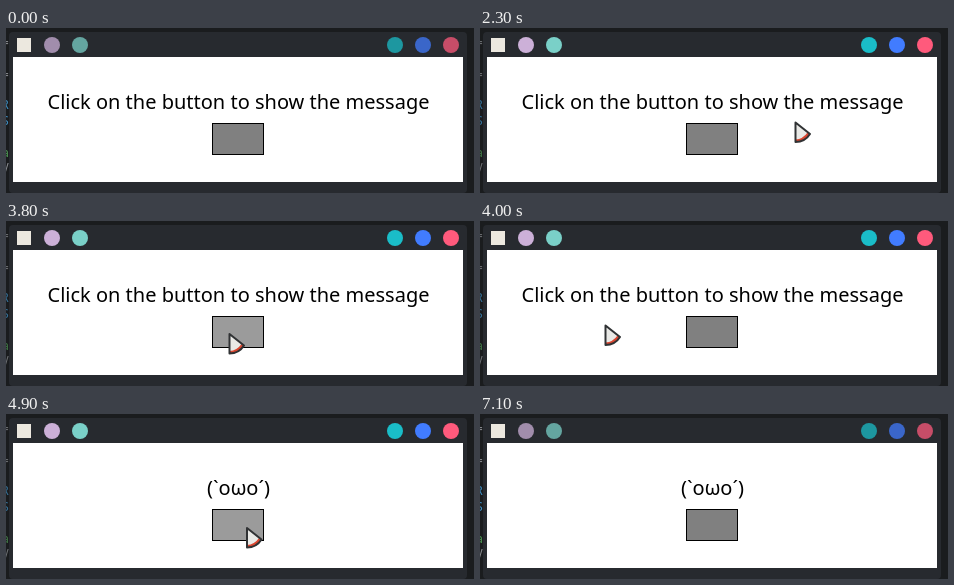
Write an HTML page that moves like this. It is 468x165 px and loops after 7.3 s.

```html
<!DOCTYPE html>
<html lang="en">
<head>
<meta charset="utf-8">
<style>
  html, body { margin: 0; width: 100%; height: 100%; overflow: hidden; background: #1a1c1e; }
  svg { display: block; }
  #side { font: 12px "Noto Sans Mono", monospace; fill: #8a8d91; }
  #message { font: 20px "Noto Sans", sans-serif; text-anchor: middle; }
</style>
</head>
<body>
<svg width="468" height="165" viewBox="0 0 468 165">
  <rect width="468" height="165" fill="#1a1c1e"/>
  <g id="side" text-anchor="end">
    <text x="3" y="19">=</text>
    <text x="3" y="51">=</text>
    <text x="3" y="81" fill="#3f8fc4">R</text>
    <text x="3" y="97" fill="#3f8fc4">S</text>
    <text x="3" y="129" fill="#4f9a55">a</text>
    <text x="3" y="144">V</text>
  </g>
  <rect x="3" y="4" width="458" height="161" rx="4" fill="#272a2f"/>
  <rect x="7" y="29" width="450" height="125" fill="#fff"/>
  <rect x="11" y="10" width="14" height="14" fill="#ece8df"/>
  <g id="controls">
    <circle cx="46" cy="17" r="8" fill="#ccb0d8"/>
    <circle cx="74" cy="17" r="8" fill="#7ad0c8"/>
    <circle cx="389" cy="17" r="8" fill="#1abdc8"/>
    <circle cx="417" cy="17" r="8" fill="#417cff"/>
    <circle cx="445" cy="17" r="8" fill="#ff5a7c"/>
  </g>
  <text id="message" x="232.5" y="81"></text>
  <rect id="button" x="206.5" y="95.5" width="51" height="31" stroke="#000"/>
  <g id="cursor" stroke-linejoin="round">
    <path d="M1.5 1.5 16 13Q11 21 1.5 21Z" fill="#e9e9e6"/>
    <path d="M1.5 18.5Q9 18 13.5 11.5L16 13Q11 21 1.5 21Z" fill="#d9452f"/>
    <path d="M1.5 1.5 16 13Q11 21 1.5 21Z" fill="none" stroke="#303234" stroke-width="2"/>
  </g>
</svg>
<script>
const LOOP = 7300;
const [side, controls, message, button, cursor] =
  ["side", "controls", "message", "button", "cursor"].map(id => document.getElementById(id));

// Pointer positions: [ms, x, y]; each holds until the next.
const pointer = [
  [400, 374, 103], [500, 307, 92], [800, 316, 92], [900, 323, 92.5],
  [2300, 314, 93], [2400, 306, 93],
  [2600, 317, 87], [2700, 346, 62], [2800, 375, 39], [2900, 385, 32],
  [3200, 365, 47], [3300, 302, 84], [3400, 245, 107], [3500, 226, 111],
  [3800, 222, 111.5], [3900, 168, 107], [4000, 124, 103],
  [4200, 166, 107], [4300, 222, 112], [4400, 239.5, 112.5],
  [6200, 157, 32]
];
const during = (t, from, to) => t >= from && t < to;

function draw(t) {
  const focused = during(t, 700, 7100);
  const visible = during(t, 400, 6300);
  const [, x, y] = pointer.findLast(p => p[0] <= t) || pointer[0];
  const hover = visible && during(x, 206, 258) && during(y, 95, 127);
  const pressed = during(t, 4800, 4900);

  controls.setAttribute("opacity", focused ? 1 : .74);
  side.setAttribute("opacity", focused ? .75 : 1);
  message.textContent = t < 4900 ? "Click on the button to show the message" : "(`oωo´)";
  button.setAttribute("fill", pressed ? "#646464" : hover ? "#9b9b9b" : "#808080");
  cursor.setAttribute("visibility", visible ? "visible" : "hidden");
  cursor.setAttribute("transform", `translate(${x} ${y})`);
}

const start = performance.now();
function tick() {
  draw((performance.now() - start) % LOOP);
  requestAnimationFrame(tick);
}
tick();
</script>
</body>
</html>
```
